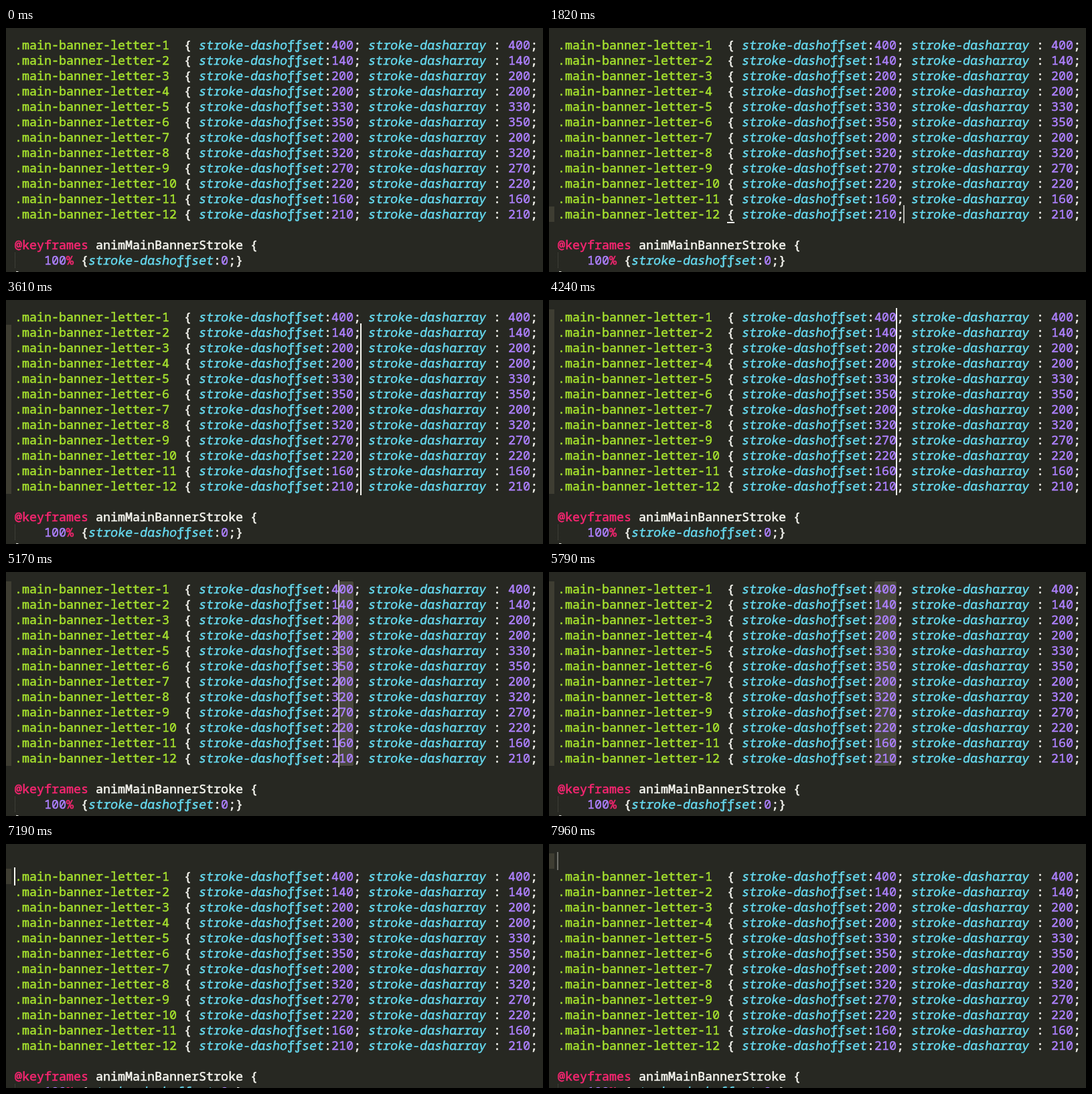
Write an HTML page with a canvas that moves like this. It is 802 px wide and 365 px high and loops after 8000 ms.

```html
<!DOCTYPE html>
<html lang="en">
<head>
<meta charset="utf-8">
<title>Multiple carets in a code editor</title>
<style>
  html, body { margin: 0; width: 100%; height: 100%; overflow: hidden; background: #272822; }
  canvas { display: block; }
</style>
</head>
<body>
<canvas id="stage" width="802" height="365"></canvas>
<script>
const LOOP = 8000, W = 802, H = 365;
const LEFT = 13, TOP = 14, CHAR = 11, ROW = 23, BASE = 18;
const SLANT = 0.17, WEIGHT = 0.5;
const CURSIVE = { a: 'ɑ', f: 'ƒ' };
const FONT = '18.333px "Noto Sans Mono", "DejaVu Sans Mono", monospace';
const C = {
  back: '#272822', line: '#3e3d32', select: '#49483e', border: '#222218',
  guide: '#51524b', outline: '#a0a09a', white: '#f8f8f2', green: '#a6e22e',
  cyan: '#66d9ef', purple: '#ae81ff', pink: '#f92672'
};

const ctx = document.getElementById('stage').getContext('2d');
const colX = col => LEFT + col * CHAR;
const rowY = row => TOP + row * ROW;

const lengths = [400, 140, 200, 200, 330, 350, 200, 320, 270, 220, 160, 210];
const property = name => [name, C.cyan, true];
const rows = lengths.map((n, i) => [
  [`.main-banner-letter-${i + 1}`.padEnd(23), C.green],
  ['{ ', C.white], property('stroke-dashoffset'), [':', C.white],
  [`${n}`, C.purple], ['; ', C.white],
  property('stroke-dasharray'), [' : ', C.white],
  [`${n}`, C.purple], [';', C.white]
]);
rows.push(
  [],
  [['@keyframes', C.pink], [' animMainBannerStroke {', C.white]],
  [['    100', C.purple], ['%', C.pink], [' {', C.white],
    property('stroke-dashoffset'), [':', C.white], ['0', C.purple], [';}', C.white]],
  [['}', C.white]]
);

// The code never changes, so it is drawn once and only shifted later.
function drawCode() {
  const layer = document.createElement('canvas');
  layer.width = W;
  layer.height = H + 2 * ROW;
  const g = layer.getContext('2d');
  g.font = FONT;
  g.lineWidth = WEIGHT;
  g.lineJoin = 'round';
  rows.forEach((tokens, row) => {
    let col = 0;
    for (const [text, color, italic] of tokens) {
      g.fillStyle = g.strokeStyle = color;
      for (const ch of text) {
        const glyph = italic && CURSIVE[ch] || ch;
        const slant = italic && glyph !== CURSIVE.f ? SLANT : 0;
        g.setTransform(1, 0, -slant, 1, colX(col++) - slant * 5, rowY(row) + BASE);
        if (ch === ' ') continue;
        g.fillText(glyph, 0, 0);
        g.strokeText(glyph, 0, 0);
      }
    }
  });
  g.resetTransform();
  g.fillStyle = C.guide;
  for (let y = 0; y < ROW; y += 2) g.fillRect(LEFT, rowY(14) + y, 1, 1);
  return layer;
}
const code = drawCode();

const ADD_CARET = [1370, 2360, 2530, 2680, 2830, 2910, 3060, 3230, 3310, 3460, 3610, 3780];
const MOVE_LEFT = [4240, 4540, 4770, 5260];
const SINGLE = 6420, MATCH = 6490, HOME = 6720, ENTER = 7190, UP = 7490;
const INPUTS = [...ADD_CARET, ...MOVE_LEFT, SINGLE, HOME, ENTER, UP];
const FADE_OUT = [1820, 4160, 5170, 5640, 7110, 7880];
const FADE_IN = 6190, FADE_STEP = 75;

const passed = (times, t) => times.filter(time => time <= t).length;
const latest = (times, t) => Math.max(-1, ...times.filter(time => time <= t));

function caretAlpha(t) {
  const fade = latest(FADE_OUT, t);
  if (fade < latest(INPUTS, t)) return 1;
  const level = start => Math.min(2, Math.floor((t - start) / FADE_STEP));
  return t >= FADE_IN && fade < FADE_IN
    ? [0.35, 0.7, 1][level(FADE_IN)]
    : [0.7, 0.35, 0][level(fade)];
}

function editorState(t) {
  const count = passed(ADD_CARET, t);
  if (t >= HOME) return { first: t >= ENTER && t < UP ? 1 : 0, count: 1, col: 0, end: 0 };
  const col = 47 - passed(MOVE_LEFT, t);
  const end = t >= MOVE_LEFT[0] ? 46 : col;
  return t >= SINGLE
    ? { first: 0, count: 1, col, end, brace: true }
    : { first: 12 - count, count, col, end, brace: count < 11 };
}

function pointerAt(t) {
  if (t < 430 || t >= 1600) return null;
  if (t < 890) {
    const p = Math.min(4, Math.floor((t - 430) / 77)) / 4;
    const left = (1 - p) ** 2;
    return [Math.round(510 + 178 * left), Math.round(268 + 59 * left)];
  }
  const p = Math.min(4, Math.floor((t - 890) / 76) + 1) / 4;
  return [Math.round(510 + 17 * p), Math.round(268 + p)];
}

function box(color, x, y, w, h) {
  ctx.fillStyle = color;
  ctx.fillRect(x, y, w, h);
}

// A one pixel rounded frame just around a block of text cells.
function frame(color, col, y, cols, height, fill) {
  ctx.beginPath();
  ctx.roundRect(colX(col) - 0.5, y - 0.5, cols * CHAR + 1, height + 1, 2.5);
  if (fill) {
    ctx.fillStyle = fill;
    ctx.fill();
  }
  ctx.strokeStyle = color;
  ctx.lineWidth = 1;
  ctx.stroke();
}

function drawPointer([x, y]) {
  for (const edge of [y, y + 15]) {
    box(C.white, x, edge, 3, 1);
    box(C.white, x + 4, edge, 3, 1);
  }
  box(C.white, x + 3, y + 1, 1, 14);
}

function draw(t) {
  const { first, count, col, end, brace } = editorState(t);
  const top = rowY(first), height = count * ROW;
  box(C.back, 0, 0, W, H);
  box(C.line, 0, top, 8, height);
  if (end > col) frame(C.border, col, top, end - col, height, C.select);
  ctx.drawImage(code, 0, t >= ENTER ? ROW : 0);

  if (brace) {
    for (let i = 1; i <= count; i++) box(C.white, colX(23), top + i * ROW, CHAR, 2);
  }
  if (t >= MATCH && t < HOME) frame(C.outline, 67, TOP, 3, ROW);

  ctx.globalAlpha = caretAlpha(t);
  if (count) box(C.white, colX(col) - 1, top - 2, 2, height + 4);
  ctx.globalAlpha = 1;

  const pointer = pointerAt(t);
  if (pointer) drawPointer(pointer);
}

const start = performance.now();
function tick() {
  draw((performance.now() - start) % LOOP);
  requestAnimationFrame(tick);
}
tick();
</script>
</body>
</html>
```
